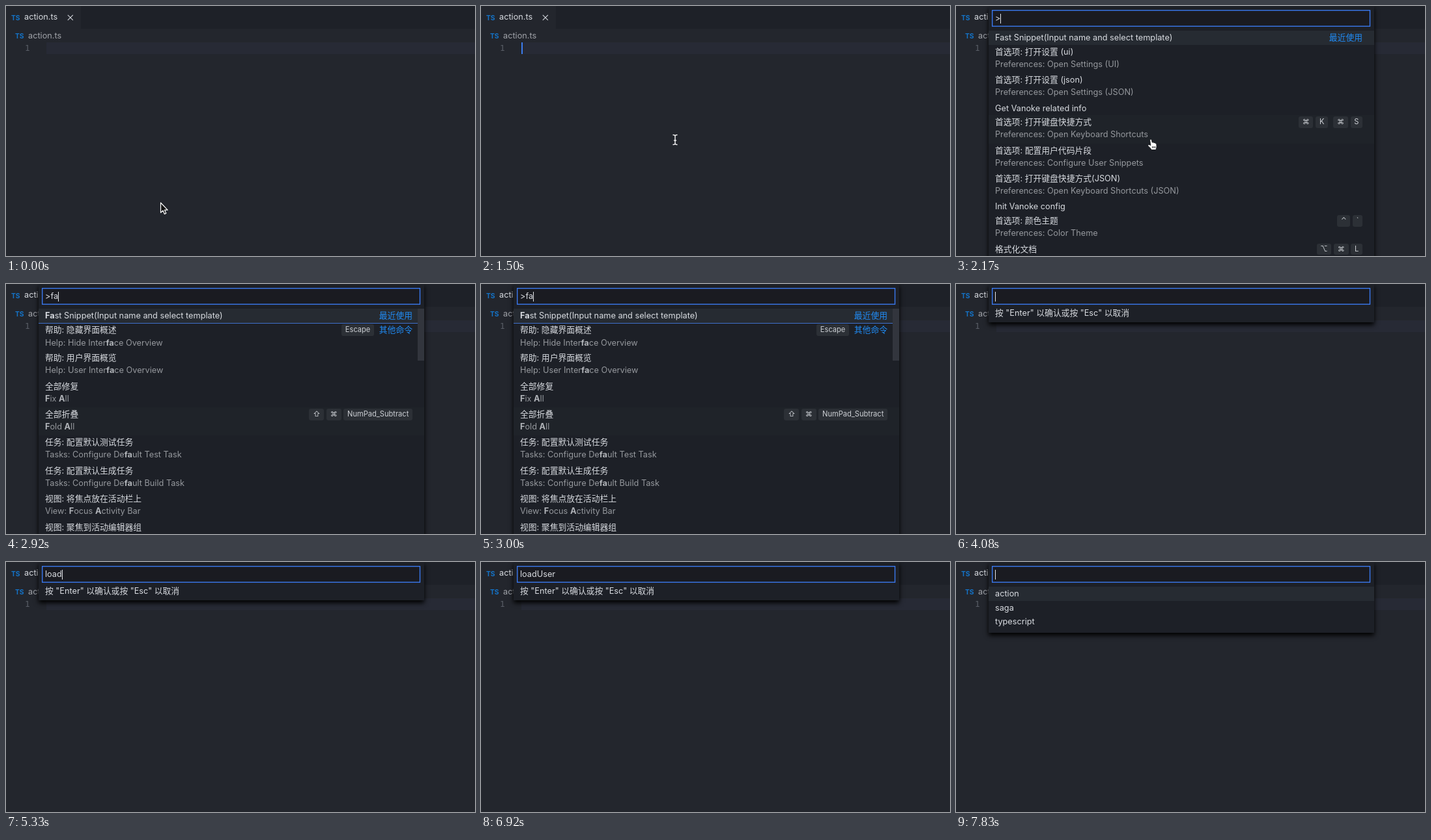
Write an HTML page that moves like this. It is 720 px wide and 385 px high and loops after 8000 ms.

```html
<!DOCTYPE html>
<html lang="zh-CN">
<head>
<meta charset="utf-8">
<title>Command palette</title>
<style>
  html, body { margin: 0; width: 100%; height: 100%; overflow: hidden; background: #23262d; }
  #stage {
    position: relative; width: 720px; height: 385px; overflow: hidden;
    background: #23262d; color: #d8dbe0;
    font: 12.73px/22px Inter, "Noto Sans CJK SC", "Noto Sans CJK", "DejaVu Sans", sans-serif;
    white-space: pre;
  }
  #stage * { box-sizing: border-box; }
  #stage div, #stage svg { position: absolute; }
  .tabs { left: 115px; top: 0; right: 0; height: 35px; background: #1e2128; }
  .ts { font-size: 10.3px; font-weight: 700; color: #1473c8; }
  .crumb { color: #a0a3a9; }
  .line { left: 62px; top: 56px; right: 0; height: 18px; background: #272a35; }
  .num { left: 29px; top: 54px; color: #5a5e67; font: 12.6px/22px "DejaVu Sans Mono", monospace; }
  #caret { left: 62px; top: 56px; width: 2px; height: 18px; background: #3b7cee; }

  #palette { left: 50px; top: 0; width: 592px; background: #1d2027; box-shadow: 0 4px 7px #000; }
  #frame { left: 0; top: 0; }
  #input { left: 10px; top: 6px; height: 26px; display: flex; align-items: center; }
  #bar { width: 1px; height: 15px; background: #e4e6ea; }
  .view { left: 0; top: 38px; width: 592px; }
  .row { left: 0; width: 592px; }
  .row.first { background: #262b32; }
  .row.hover { background: #1f2329; }
  .row.split { border-top: 1px solid #3f70cc; }
  .title { left: 10px; top: 0; }
  .row.split .title, .row.split .side { margin-top: -.5px; }
  .desc { left: 10px; top: 19px; color: #95989d; }
  .desc b { color: #b2b5ba; }
  .side { right: 18px; top: 0; height: 22px; display: flex; align-items: center; gap: 3.8px; }
  .side kbd {
    height: 17.5px; padding: 0 5.7px; border-radius: 3px; background: #2c3036; color: #cdd0d5;
    font: 11.1px/17.5px Inter, "DejaVu Sans", sans-serif;
  }
  .side s { width: .5px; }
  .side em { margin-left: 4px; font-style: normal; color: #208cf6; }
  .cjk { font-size: 12.8px; line-height: 1; }
  .scroll { right: 0; top: 0; width: 10px; height: 80px; background: #32353d; }
  #mouse { left: 0; top: 0; overflow: visible; }
</style>
</head>
<body>
<div id="stage">
  <div class="tabs"></div>
  <div class="ts" style="left:8px;top:7px">TS</div>
  <div style="left:28px;top:6px">action.ts</div>
  <svg style="left:94px;top:13px" width="10" height="10"><path d="M.8 .8l8 8m0-8l-8 8" stroke="#d3d6dc" stroke-width="1.1"/></svg>
  <div class="ts" style="left:14px;top:35px">TS</div>
  <div class="crumb" style="left:34px;top:35px">action.ts</div>
  <div class="line"></div>
  <div class="num">1</div>
  <div id="caret"></div>
  <div id="palette">
    <svg id="frame" width="592" height="36"><rect x="5.7" y="6.7" width="579.8" height="24.5" fill="#1a1b21" stroke="#3a78ee" stroke-width="1.4"/></svg>
    <div id="input"><span id="query"></span><span id="bar"></span></div>
  </div>
  <svg id="mouse" width="1" height="1">
    <path id="arrow" d="M0 0V15.2L3.5 12L5.9 17.4L8.3 16.3L6 11.2H10.6Z" fill="#111" stroke="#fff" stroke-width="1.2" stroke-linejoin="round"/>
    <path id="beam" d="M-3 -7.5Q0 -7.5 0 -5.5Q0 -7.5 3 -7.5M0 -5.5V5.5M-3 7.5Q0 7.5 0 5.5Q0 7.5 3 7.5M-1.5 1H1.5" fill="none" stroke="#f2f2f2" stroke-width="1.4" stroke-linecap="round"/>
    <path id="hand" d="M-1.3 1Q-1.6 -1 0 -1Q1.2 -1 1.5 .8L2.3 4.3Q3.8 3.2 4.6 4.7Q6.2 3.9 6.9 5.4Q8.6 5 8.9 7L9 10.5Q8.8 12.5 7.8 15.5H1.2Q-.5 12.6 -4 9.5Q-5 7.6 -3.2 7.4Q-1.6 7.6 -.2 8.8ZM2.5 10V13M4.5 10V13M6.5 10V13" fill="#fff" stroke="#15171b" stroke-width=".9" stroke-linejoin="round"/>
  </svg>
</div>
<script>
const LOOP = 8000, UNIT = 21.7;
const $ = id => document.getElementById(id);

// [..] marks matched letters; Chinese runs have their own size
const rich = s => s
  .replace(/[\u4e00-\u9fff]+/g, '<span class="cjk">$&</span>')
  .replace(/\[(.*?)\]/g, '<b>$1</b>');

const addDiv = (parent, cls, html = '') => {
  const el = document.createElement('div');
  el.className = cls;
  el.innerHTML = html;
  parent.append(el);
  return el;
};

const FAST = 'Fast Snippet(Input name and select template)';
const fastRow = n => [(n ? `[${FAST.slice(0, n)}]` : '') + FAST.slice(n), '', '', '最近使用'];

// rows: title, description, keys, group
const recent = [
  fastRow(0),
  ['首选项: 打开设置 (ui)', 'Preferences: Open Settings (UI)'],
  ['首选项: 打开设置 (json)', 'Preferences: Open Settings (JSON)'],
  ['Get Vanoke related info'],
  ['首选项: 打开键盘快捷方式', 'Preferences: Open Keyboard Shortcuts', '⌘ K  ⌘ S'],
  ['首选项: 配置用户代码片段', 'Preferences: Configure User Snippets'],
  ['首选项: 打开键盘快捷方式(JSON)', 'Preferences: Open Keyboard Shortcuts (JSON)'],
  ['Init Vanoke config'],
  ['首选项: 颜色主题', 'Preferences: Color Theme', '⌃ `'],
  ['格式化文档', 'Format Document', '⌥ ⌘ L']
];
const matches = [
  ['帮助: 隐藏界面概述', 'Help: Hide Inter[fa]ce Overview', 'Escape', '其他命令'],
  ['帮助: 用户界面概览', 'Help: User Inter[fa]ce Overview'],
  ['全部修复', '[F]ix [A]ll'],
  ['全部折叠', '[F]old [A]ll', '⇧ ⌘ NumPad_Subtract'],
  ['任务: 配置默认测试任务', 'Tasks: Configure De[fa]ult Test Task'],
  ['任务: 配置默认生成任务', 'Tasks: Configure De[fa]ult Build Task'],
  ['视图: 将焦点放在活动栏上', 'View: [F]ocus [A]ctivity Bar'],
  ['视图: 聚焦到活动编辑器组', 'View: [F]ocus [A]ctive Editor Group']
];
const onlyF = s => s.replace(/\[(f?)(a?)\]/gi, (_, f, a) => (f ? `[${f}]` : '') + a);

const views = {};
function addView(name, rows, { hover = -1, scroll = false } = {}) {
  const el = addDiv($('palette'), 'view');
  let y = 0;
  rows.forEach(([title, desc, keys, group], i) => {
    const h = desc ? 2 * UNIT : UNIT;
    const kind = i === 0 ? ' first' : i === hover ? ' hover' : '';
    const row = addDiv(el, 'row' + kind + (i && group ? ' split' : ''));
    row.style.cssText = `top:${y}px;height:${h}px`;
    addDiv(row, 'title', rich(title));
    if (desc) addDiv(row, 'desc', rich(desc));
    const caps = keys ? keys.split(' ').map(k => k ? `<kbd>${k}</kbd>` : '<s></s>').join('') : '';
    addDiv(row, 'side', caps + (group ? `<em>${rich(group)}</em>` : ''));
    y += h;
  });
  if (scroll) addDiv(el, 'scroll');
  views[name] = { el, height: Math.min(400, 38 + y + 5.5) };
}

addView('recent', recent, { hover: 4 });
addView('f', [fastRow(1), ...matches.map(([t, d, ...more]) => [t, onlyF(d), ...more])], { hover: 4, scroll: true });
addView('fa', [fastRow(2), ...matches], { hover: 4, scroll: true });
addView('fas', [fastRow(3)]);
addView('fast', [fastRow(4)]);
addView('pick', [['action'], ['saga'], ['typescript']]);

const prompt = addDiv($('palette'), 'view');
addDiv(prompt, 'title', rich('按 "Enter" 以确认或按 "Esc" 以取消')).style.top = '-4px';
views.prompt = { el: prompt, height: 59 };

// time, view, typed text
const steps = [
  [0, '', ''],
  [2000, 'recent', '>'], [2750, 'f', '>f'], [2920, 'fa', '>fa'], [3080, 'fas', '>fas'], [3250, 'fast', '>fast'],
  [4000, 'prompt', ''],
  ...[[5080, 1], [5170, 2], [5330, 4], [5670, 5], [6000, 6], [6330, 7], [6420, 8], [7000, 9], [7080, 10], [7170, 11], [7330, 12]]
    .map(([t, n]) => [t, 'prompt', 'loadUserInfo'.slice(0, n)]),
  [7830, 'pick', '']
];

// time, pointer shape, x, y
const pointer = [
  [0, 'arrow', 237.5, 303], [80, 'beam', 262, 275], [165, 'beam', 285, 248], [250, 'beam', 294, 235],
  [500, 'beam', 294, 226], [1000, 'beam', 295, 219], [1080, 'beam', 297, 211], [1170, 'beam', 298, 206],
  [2080, 'hand', 299, 206], [2750, '', 0, 0]
];

const at = (list, t) => list.findLast(item => item[0] <= t);
const show = (el, on) => { el.style.display = on ? '' : 'none'; };

function draw(t) {
  const [start, view, text] = at(steps, t);
  const [, shape, x, y] = at(pointer, t);
  const half = Math.floor((t - start) / 500) % 2;

  show($('caret'), !view && half === 1);
  show($('palette'), view);
  for (const name in views) show(views[name].el, name === view);
  if (view) $('palette').style.height = views[view].height + 'px';
  if ($('query').textContent !== text) $('query').textContent = text;
  $('bar').style.opacity = half ? 0 : 1;

  for (const id of ['arrow', 'beam', 'hand']) show($(id), id === shape);
  $('mouse').style.transform = `translate(${x}px, ${y}px)`;
}

const began = performance.now();
function tick() {
  draw((performance.now() - began) % LOOP);
  requestAnimationFrame(tick);
}
tick();
</script>
</body>
</html>
```
